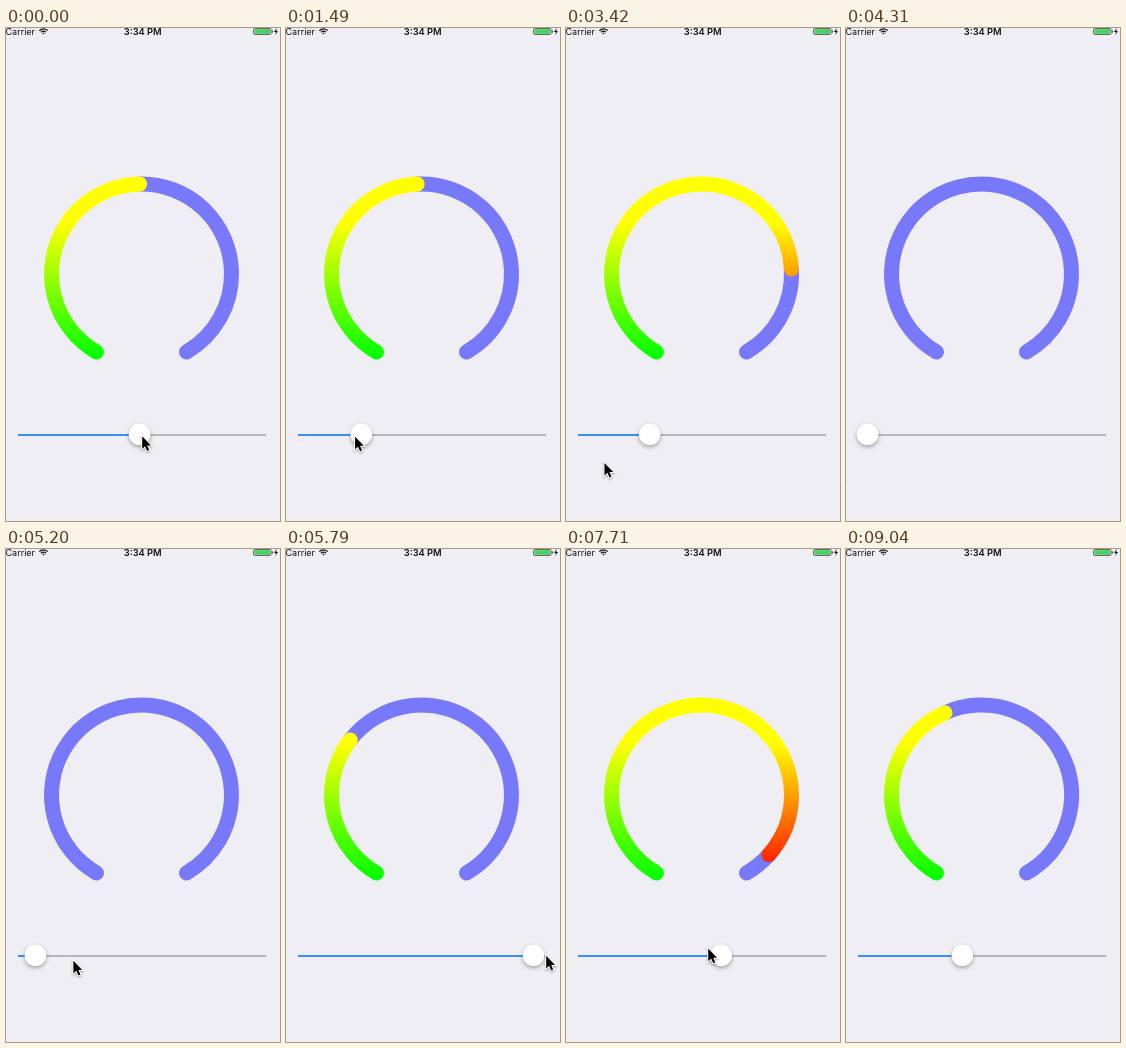
These frames come from a looping animation (274 px wide and 493 px high, 9.49 s). An HTML page with a canvas:

```html
<!DOCTYPE html>
<html lang="en">
<head>
<meta charset="utf-8">
<title>Gauge and slider</title>
<style>
  html, body { margin: 0; width: 100%; height: 100%; overflow: hidden; background: #efeef4; }
  canvas { display: block; }
</style>
</head>
<body>
<canvas id="stage" width="274" height="493"></canvas>
<script>
const ctx = document.getElementById('stage').getContext('2d');
const LOOP = 9490, STEP = 148.3;
const GAUGE_DELAY = 3, CURSOR_LEAD = .55; // in steps, relative to the slider
const CENTER_X = 135.5, CENTER_Y = 246, RADIUS = 90, TRACK_Y = 407;

// The hand drags from one resting pose to the next; start and end are in steps.
const rest = { value: .496, x: 135, y: 406.5 };
const drags = [
  { start: 6.6, end: 11.6, value: .16, x: 60, y: 407 },
  { start: 11.6, end: 18.6, value: .87, x: 223, y: 407 },
  { start: 18.6, end: 25.7, value: 0, x: -12, y: 440 },
  { start: 31, end: 32.5, value: 0, x: 28, y: 411 },
  { start: 34.55, end: 38.3, value: 1, x: 259, y: 405 },
  { start: 47.5, end: 54.6, value: .42, x: 113, y: 396 },
  { start: 54.6, end: 61, value: .42, x: 134, y: 500 }
];

function ease(u) {
  return (1 - Math.cos(Math.PI * Math.min(Math.max(u, 0), 1))) / 2;
}

function pose(property, step) {
  return drags.reduce(
    (from, drag) => from + (drag[property] - from) * ease((step - drag.start) / (drag.end - drag.start)),
    rest[property]);
}

function verticalGradient(bottomColor) {
  const gradient = ctx.createLinearGradient(0, 195, 0, 331);
  gradient.addColorStop(0, '#ff0');
  gradient.addColorStop(1, bottomColor);
  return gradient;
}
const leftFill = verticalGradient('#0f0');
const rightFill = verticalGradient('#f00');

function trackLine(from, to, color) {
  ctx.fillStyle = color;
  ctx.fillRect(from, TRACK_Y - .8, to - from, 1.6);
}

function polygon(points) {
  ctx.beginPath();
  points.forEach(([x, y]) => ctx.lineTo(x, y));
  ctx.closePath();
}

function gaugeArc(from, to, style) {
  const angle = value => (120 + 300 * value) * Math.PI / 180;
  ctx.beginPath();
  ctx.arc(CENTER_X, CENTER_Y, RADIUS, angle(from), angle(to));
  ctx.lineWidth = 15;
  ctx.lineCap = 'round';
  ctx.strokeStyle = style;
  ctx.stroke();
}

function drawGauge(value) {
  gaugeArc(value, 1, '#7878fb');
  if (value > 0) gaugeArc(0, Math.min(value, .5), leftFill);
  if (value > .5) gaugeArc(.5, value, rightFill);
}

function drawSlider(value) {
  const x = 21.5 + 226 * value;
  trackLine(x, 260, '#a8a8ad');
  trackLine(12, x, '#0a7cfb');
  ctx.save();
  ctx.shadowColor = 'rgba(0,0,0,.32)';
  ctx.shadowBlur = 4;
  ctx.shadowOffsetY = 2;
  ctx.fillStyle = '#fff';
  ctx.beginPath();
  ctx.arc(x, 406.3, 10.8, 0, 7);
  ctx.fill();
  ctx.restore();
}

function drawCursor(x, y) {
  ctx.save();
  ctx.translate(x + 1.2, y + 1.8);
  polygon([[0, 0], [0, 12.6], [2.9, 9.9], [5, 14.6], [7, 13.7], [5, 9.1], [8.8, 9.1]]);
  ctx.shadowColor = 'rgba(0,0,0,.35)';
  ctx.shadowBlur = 2;
  ctx.shadowOffsetY = 1;
  ctx.lineWidth = 2;
  ctx.strokeStyle = '#fff';
  ctx.stroke();
  ctx.shadowColor = 'transparent';
  ctx.fillStyle = '#000';
  ctx.fill();
  ctx.restore();
}

function drawStatusBar() {
  ctx.fillStyle = '#111';
  ctx.font = '9px Inter, Roboto, sans-serif';
  ctx.textAlign = 'left';
  ctx.fillText('Carrier', -.5, 7);
  ctx.font = '600 9.3px Inter, Roboto, sans-serif';
  ctx.textAlign = 'center';
  ctx.fillText('3:34 PM', 136.7, 7);

  // Wi-Fi fan
  ctx.strokeStyle = '#111';
  ctx.lineCap = 'butt';
  ctx.lineWidth = 1.3;
  for (let radius = 1; radius < 6; radius += 2.4) {
    ctx.beginPath();
    ctx.arc(37.5, 6.6, radius, -Math.PI * .76, -Math.PI * .24);
    ctx.stroke();
  }

  // Battery with charging bolt
  ctx.lineWidth = .8;
  ctx.strokeStyle = '#444';
  ctx.beginPath();
  ctx.roundRect(247.5, .5, 17.6, 6, 1.3);
  ctx.stroke();
  ctx.fillStyle = '#45d25f';
  ctx.fillRect(248.5, 1.2, 15.6, 4.6);
  ctx.fillStyle = '#333';
  ctx.fillRect(265.8, 2.3, 1, 2.4);
  ctx.fillStyle = '#111';
  polygon([[270.6, 0], [268, 4], [270, 4], [269.2, 7], [272, 2.9], [270.2, 2.9]]);
  ctx.fill();
}

function draw(now) {
  const step = Math.floor((now % LOOP + 7) / STEP);
  ctx.fillStyle = '#efeef4';
  ctx.fillRect(0, 0, 274, 493);
  drawStatusBar();
  drawGauge(pose('value', step - GAUGE_DELAY));
  drawSlider(pose('value', step));
  drawCursor(pose('x', step + CURSOR_LEAD), pose('y', step + CURSOR_LEAD));
  requestAnimationFrame(draw);
}
requestAnimationFrame(draw);
</script>
</body>
</html>
```
